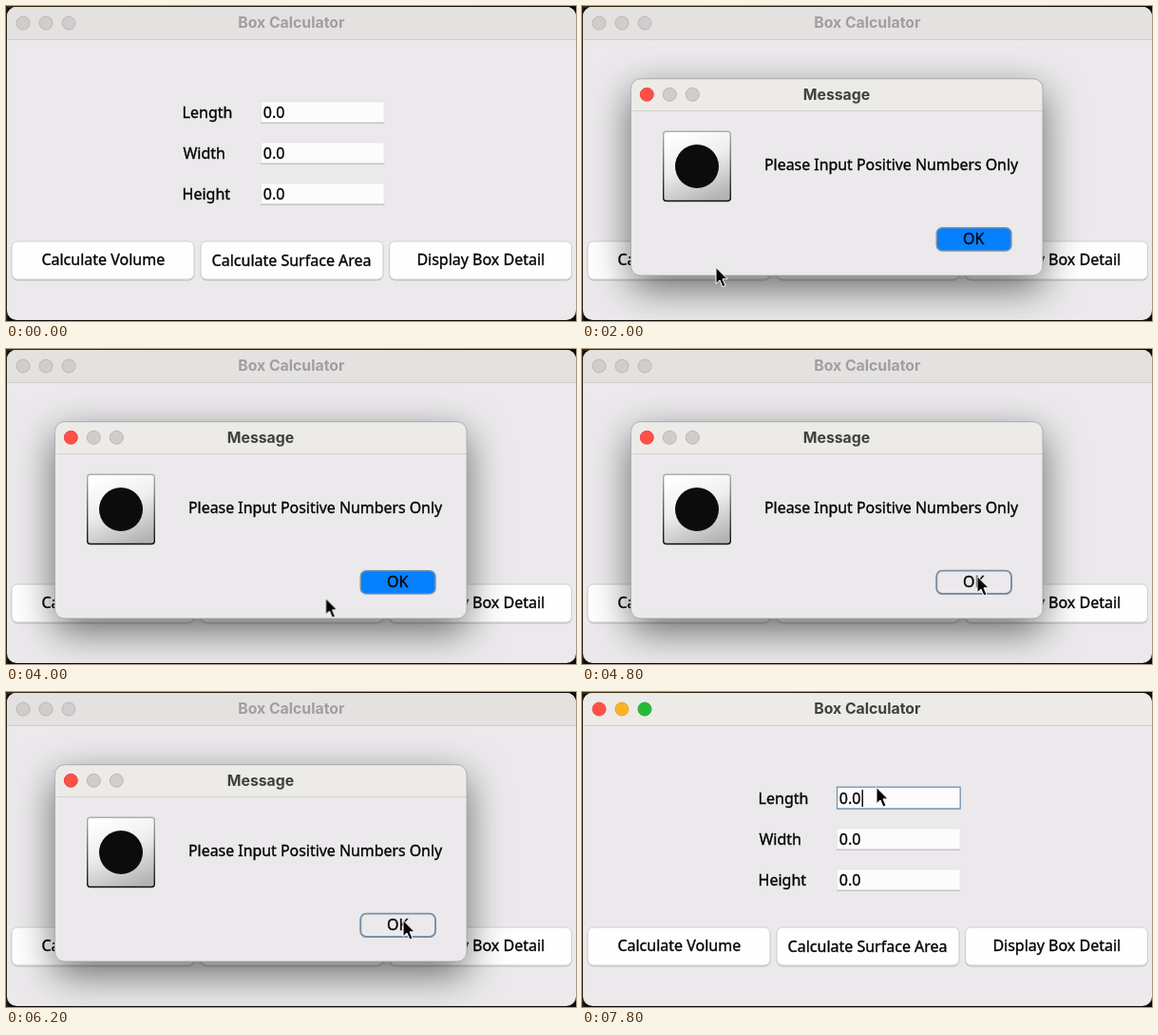
An HTML page for the animation above (8000 ms loop, 600 by 332 pixels).

```html
<!DOCTYPE html>
<html lang="en">
<head>
<meta charset="utf-8">
<title>Box Calculator</title>
<style>
html, body { margin: 0; width: 100%; height: 100%; overflow: hidden; background: #0d0c08; }
svg { display: block; width: 600px; height: 332px; }
text { font: 16px "Noto Sans", "Open Sans", sans-serif; fill: #050505; stroke: #050505; stroke-width: .35px; }
.title { font: 700 15.8px Inter, Roboto, sans-serif; fill: #403f40; stroke: none; text-anchor: middle; }
.mid { text-anchor: middle; }
.note { font-size: 15.9px; }
.dim { fill: #a09e9e; }
.off { fill: #d0cecd; stroke: #bab8b7; stroke-width: 1; }
.red { fill: #ff5047; stroke: #f0483f; }
.amber { fill: #fbb327; stroke: #eaa524; }
.green { fill: #29b936; stroke: #25ad31; }
.face { fill: #fefefe; stroke: #d0ced0; }
.ring { fill: none; stroke: #728ca8; stroke-width: 1.8; }
.field { fill: #fdfcfd; stroke: #e0dee0; stroke-width: .6; }

/* One loop is 8 s; 2.5% is one 200 ms tick. */
.anim { animation: 8s step-end infinite; }
#inactive { animation-name: inactive; }
#dialog { animation-name: dialog; }
#pressed { animation-name: pressed; }
#lengthFocus { animation-name: length; }
#volumeFocus { animation-name: volume; }
#surfaceFocus { animation-name: surface; }
#detailFocus { animation-name: detail; }
#cursor { animation-name: cursor; }

@keyframes inactive {
  0%, 20%, 47.5%, 72.5% { opacity: 1; }
  12.5%, 37.5%, 62.5%, 80%, 100% { opacity: 0; }
}
@keyframes dialog {
  0%, 37.5%, 62.5%, 80%, 100% { opacity: 0; }
  20%, 47.5%, 72.5% { opacity: 1; }
}
@keyframes pressed {
  0%, 37.5%, 62.5%, 80%, 100% { opacity: 0; }
  35%, 57.5%, 77.5% { opacity: 1; }
}
@keyframes length {
  0%, 17.5% { opacity: 0; }
  12.5%, 95%, 100% { opacity: 1; }
}
@keyframes volume {
  0%, 20%, 45%, 100% { opacity: 0; }
  17.5%, 37.5% { opacity: 1; }
}
@keyframes surface {
  0%, 47.5%, 67.5%, 100% { opacity: 0; }
  45%, 62.5% { opacity: 1; }
}
@keyframes detail {
  0%, 72.5%, 95%, 100% { opacity: 0; }
  67.5%, 80% { opacity: 1; }
}
@keyframes cursor {
  0% { transform: translate(150px, 340px); animation-timing-function: steps(3); }
  7.5% { transform: translate(141px, 275px); }
  25% { transform: translate(141px, 275px); animation-timing-function: steps(4); }
  35% { transform: translate(412px, 243px); }
  40% { transform: translate(403px, 251px); animation-timing-function: steps(2); }
  45% { transform: translate(310px, 270px); }
  47.5% { transform: translate(310px, 270px); animation-timing-function: steps(4); }
  57.5% { transform: translate(416px, 239px); }
  62.5% { transform: translate(416px, 239px); animation-timing-function: steps(2); }
  67.5% { transform: translate(459px, 255px); }
  72.5% { transform: translate(459px, 255px); animation-timing-function: steps(2); }
  77.5% { transform: translate(418px, 240px); }
  82.5% { transform: translate(433px, 248px); }
  85% { transform: translate(433px, 248px); animation-timing-function: steps(4); }
  95%, 100% { transform: translate(310px, 100px); }
}
</style>
</head>
<body>
<svg viewBox="0 0 600 332">
  <defs>
    <linearGradient id="desk">
      <stop offset="0" stop-color="#3a2c0c"/>
      <stop offset=".4" stop-color="#241d0a"/>
      <stop offset="1" stop-color="#0f0e09"/>
    </linearGradient>
    <linearGradient id="tile" x1=".3" y1="0" x2=".7" y2="1">
      <stop offset="0" stop-color="#fff"/>
      <stop offset=".45" stop-color="#efedef"/>
      <stop offset="1" stop-color="#b4b2b4"/>
    </linearGradient>
    <linearGradient id="rim" x2="0" y2="1">
      <stop offset="0" stop-color="#b0aeb0"/>
      <stop offset="1" stop-color="#0c0c0c"/>
    </linearGradient>
    <filter id="lift" x="-20%" y="-35%" width="140%" height="180%">
      <feDropShadow dx="0" dy="13" stdDeviation="20" flood-opacity=".56"/>
    </filter>
    <filter id="soft" x="-5%" y="-10%" width="110%" height="130%">
      <feDropShadow dx="0" dy="1" stdDeviation=".7" flood-opacity=".22"/>
    </filter>
    <clipPath id="frame"><rect x="1" y="1" width="599" height="330" rx="10"/></clipPath>
    <clipPath id="pane"><rect x="51.5" y="77" width="433.5" height="207" rx="10"/></clipPath>
    <g id="field">
      <rect class="field" x="268.3" y="101" width="129.7" height="22"/>
      <path d="M268 123.2H398.3" stroke="#b5b3b5"/>
      <text x="270.8" y="117.5">0.0</text>
    </g>
    <rect id="key" width="192" height="40" rx="6"/>
    <rect id="ok" x="373.3" y="233.7" width="78.6" height="24.3" rx="6"/>
  </defs>

  <rect width="600" height="332" fill="#0d0c08"/>
  <rect width="600" height="2" fill="url(#desk)"/>
  <rect width="1.5" height="332" fill="#2c240e"/>

  <g clip-path="url(#frame)">
    <rect width="600" height="332" fill="#ebe9eb"/>
    <rect width="600" height="35" fill="#edebe8"/>
    <circle class="red" cx="18" cy="18" r="7"/>
    <circle class="amber" cx="42" cy="18" r="7"/>
    <circle class="green" cx="66" cy="18" r="7"/>
    <text class="title" x="300.3" y="22.7">Box Calculator</text>
    <g id="inactive" class="anim">
      <rect width="600" height="35" fill="#e4e2e0"/>
      <circle class="off" cx="18" cy="18" r="7"/>
      <circle class="off" cx="42" cy="18" r="7"/>
      <circle class="off" cx="66" cy="18" r="7"/>
      <text class="title dim" x="300.3" y="22.7">Box Calculator</text>
    </g>
    <path d="M0 35.5H600" stroke="#d0cecd"/>
  </g>

  <text x="185.6" y="117.5">Length</text>
  <text x="186.4" y="160.5">Width</text>
  <text x="185.6" y="203.5">Height</text>
  <use href="#field"/>
  <use href="#field" y="43"/>
  <use href="#field" y="86"/>
  <g id="lengthFocus" class="anim">
    <rect x="268.5" y="100.2" width="129.7" height="22.8" fill="none" stroke="#7394b4" stroke-width="1.3"/>
    <path d="M295.2 103V121" stroke="#000" stroke-width="1.4"/>
  </g>

  <g class="face" filter="url(#soft)">
    <use href="#key" x="6" y="248"/>
    <use href="#key" x="205" y="248"/>
    <use href="#key" x="403.5" y="248"/>
  </g>
  <g class="ring">
    <use id="volumeFocus" class="anim" href="#key" x="6" y="248"/>
    <use id="surfaceFocus" class="anim" href="#key" x="205" y="248"/>
    <use id="detailFocus" class="anim" href="#key" x="403.5" y="248"/>
  </g>
  <text class="mid" x="102.3" y="273">Calculate Volume</text>
  <text class="mid" x="300.6" y="274">Calculate Surface Area</text>
  <text class="mid" x="499.8" y="273">Display Box Detail</text>

  <g id="dialog" class="anim">
    <g clip-path="url(#frame)">
      <rect x="51.5" y="77" width="433.5" height="207" rx="10" fill="#ebe9eb" filter="url(#lift)"/>
    </g>
    <g clip-path="url(#pane)">
      <rect x="51" y="76" width="435" height="34" fill="#edebe8"/>
      <path d="M51 110.5H486" stroke="#d2d0cf"/>
    </g>
    <rect x="51.5" y="76.7" width="433.5" height="207.3" rx="10" fill="none" stroke="#a3a1a3" stroke-width=".8"/>
    <circle class="red" cx="68.3" cy="93.3" r="7"/>
    <circle class="off" cx="92.3" cy="93.3" r="7"/>
    <circle class="off" cx="116.3" cy="93.3" r="7"/>
    <text class="title" x="268" y="98.5">Message</text>
    <rect x="85.7" y="132.2" width="70.6" height="73.3" rx="3" fill="url(#tile)" stroke="url(#rim)" stroke-width="1.4"/>
    <circle cx="121" cy="169" r="23" fill="#0c0c0c"/>
    <text class="note" x="192" y="173">Please Input Positive Numbers Only</text>
    <use href="#ok" fill="#0580ff" stroke="#7890a8" stroke-width="1.6"/>
    <g id="pressed" class="anim">
      <use href="#ok" fill="#ebe9eb" stroke="#7890a8" stroke-width="1.8"/>
    </g>
    <text class="mid" x="412.2" y="251">OK</text>
  </g>

  <g id="cursor" class="anim">
    <path d="M0 .5V17.6L4 14L7 21L10 19.7L7 12.8H12.2Z" fill="#050505" stroke="#fff" stroke-width="1" stroke-linejoin="round"/>
  </g>
</svg>
</body>
</html>
```
